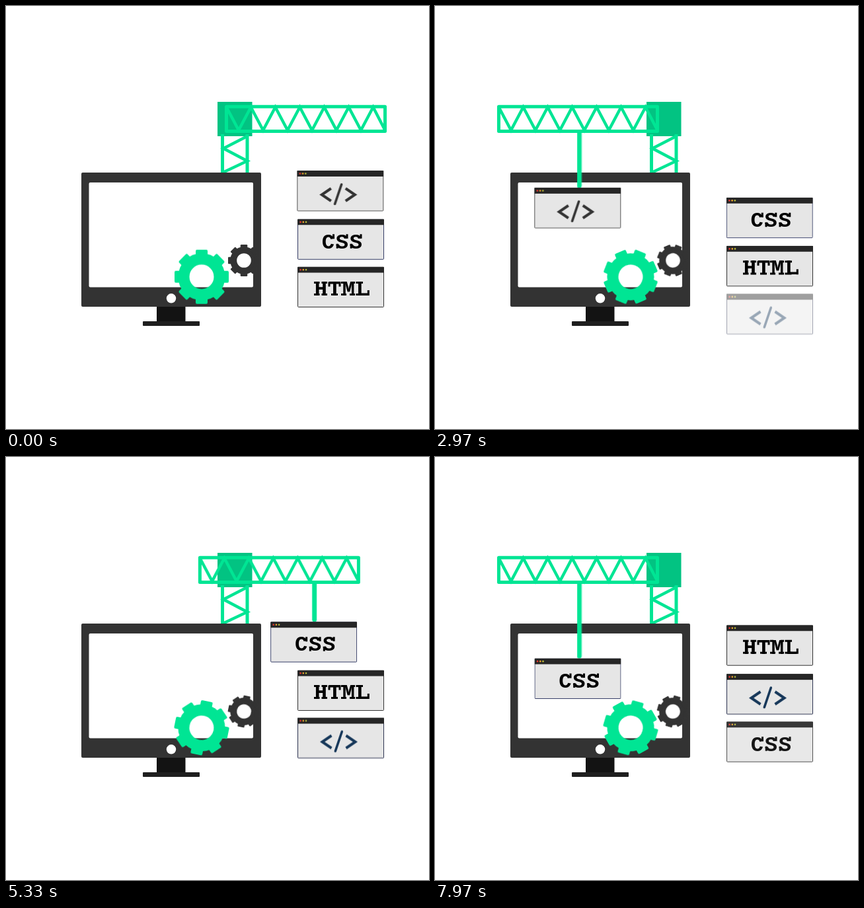
An HTML page without scripts that plays this animation: 640x640 px, repeating every 8000 ms.

```html
<!DOCTYPE html>
<html lang="en">
<head>
<meta charset="utf-8">
<title>Website under construction</title>
<style>
  html, body { margin: 0; width: 100%; height: 100%; overflow: hidden; background: #fff; }
  svg { display: block; width: 100vw; height: 100vh; }

  .green { stroke: #00e594; fill: none; stroke-width: 5; }
  .label { font: bold 32px "Liberation Mono", "Courier New", monospace; letter-spacing: 1.8px; }
  .serif { fill: none; stroke: #000; stroke-width: 3; }
  .icon { fill: none; stroke-width: 4; }

  .move { animation: 8s linear infinite; }
  .spin { animation-name: spin; }
  .boom { animation-name: boom; }
  .trolley { animation-name: trolley; }
  .rope { animation-name: rope; }
  .first { animation-name: first; }
  .second { animation-name: second; }
  .third { animation-name: third; }
  .fourth { animation-name: fourth; }
  .fifth { animation-name: fifth; }

  @keyframes spin { to { transform: rotate(422.4deg); } }

  /* Swing left with a load, swing back empty, repeat */
  @keyframes boom {
    0%, 7.15%, 56.45%, 63.6% { transform: translateX(0); }
    25.09%, 44.16%, 81.54%, 100% { transform: translateX(-237px); }
  }
  @keyframes trolley {
    0%, 25.09%, 56.46%, 81.54% { transform: translateX(0); }
    31.62%, 56.45%, 88.08%, 100% { transform: translateX(-51.5px); }
  }
  @keyframes rope {
    0%, 56.45% { transform: translateY(0); }
    7.15%, 25.09%, 63.6%, 81.54% { transform: translateY(60px); }
    31.62%, 88.08% { transform: translateY(59px); }
    44.16% { transform: translateY(120px); }
    100% { transform: translateY(117px); }
  }

  /* Cards: hauled by the crane, or queued in the column */
  @keyframes first {
    0%, 7.15% { transform: translate(0, 0); }
    25.09% { transform: translate(-238.5px, -1px); }
    31.62% { transform: translate(-290px, -1px); }
    44.16% { transform: translate(-290px, 60px); opacity: 1; }
    56.45%, 100% { transform: translate(-290px, 114px); opacity: 0; }
  }
  @keyframes second {
    0%, 31.62% { transform: translate(0, 0); }
    44.16% { transform: translate(-.5px, -74px); }
    56.45%, 63.6% { transform: translate(-.5px, -73px); }
    81.54% { transform: translate(-239px, -74px); }
    88.08% { transform: translate(-290.5px, -74px); }
    100% { transform: translate(-290.5px, -16px); }
  }
  @keyframes third {
    0%, 31.62% { transform: translateY(0); }
    44.16%, 88.08% { transform: translateY(-72px); }
    100% { transform: translateY(-142.4px); }
  }
  @keyframes fourth {
    0%, 31.62% { transform: translateY(73px); opacity: 0; }
    44.16%, 88.08% { transform: translateY(0); opacity: 1; }
    100% { transform: translateY(-68.5px); opacity: 1; }
  }
  @keyframes fifth {
    0%, 88.08% { transform: translateY(73px); opacity: 0; }
    100% { transform: translateY(3.6px); opacity: .95; }
  }
</style>
</head>
<body>
<svg viewBox="0 0 640 640">
  <defs>
    <rect id="tooth" x="-9" y="-41" width="18" height="13" rx="2"/>
    <g id="pair">
      <use href="#tooth"/>
      <use href="#tooth" transform="rotate(180)"/>
    </g>
    <g id="gear">
      <circle r="27" fill="none" stroke="currentColor" stroke-width="17"/>
      <g fill="currentColor">
        <use href="#pair"/>
        <use href="#pair" transform="rotate(45)"/>
        <use href="#pair" transform="rotate(90)"/>
        <use href="#pair" transform="rotate(135)"/>
      </g>
    </g>

    <g id="card">
      <rect x=".5" y=".5" width="130" height="60.5" rx="1" fill="#e6e6e6" stroke="currentColor"/>
      <path d="M0 9V1Q0 0 1 0H130Q131 0 131 1V9Z" fill="#262626"/>
      <circle cx="4.6" cy="4.6" r="1.3" fill="#e8352e"/>
      <circle cx="8.8" cy="4.6" r="1.3" fill="#f0a52c"/>
      <circle cx="13" cy="4.6" r="1.3" fill="#b5b83a"/>
    </g>
    <g id="code" class="icon" stroke="currentColor">
      <path d="M51.5 27L37.5 36.5L51.5 46M73.5 27L87.5 36.5L73.5 46"/>
      <path d="M67.3 21L57.3 50.5" stroke-width="3.6" stroke-linecap="round"/>
    </g>
    <g id="css">
      <text class="label" x="36.8" y="44.3">CSS</text>
      <path class="serif" d="M54.5 23V30M75 23V29.5M96 23V29.5M60.2 37.5V44.5M81.2 37.5V44.5"/>
    </g>
    <g id="html">
      <text class="label" x="25.8" y="43.6">HTML</text>
      <path class="serif" d="M25 24h8.5M36.5 24h8.5M25 42.1h8.5M36.5 42.1h8.5
        M48 23v7M64 23v7M51 42.1h10M66 24h5M82 24h5M66 42.1h8M79 42.1h8
        M88.5 24h10.5M88.5 42.1h10M107.3 35.5v8"/>
    </g>
    <clipPath id="below"><rect x="0" y="189" width="640" height="300"/></clipPath>
  </defs>

  <!-- Tower -->
  <rect x="320" y="145" width="52.5" height="52" fill="#02c382"/>
  <g class="green">
    <path d="M327.5 194V256M365 194V256"/>
    <path d="M365 197L329 215.5L365 234.5L329 251.5" stroke-width="4.5"/>
  </g>

  <!-- Monitor -->
  <rect x="228" y="454" width="43.5" height="24" fill="#131313"/>
  <rect x="207" y="477" width="86" height="7" rx="1" fill="#1f1f1f"/>
  <rect x="114" y="252" width="272" height="203" rx="2" fill="#333"/>
  <rect x="125.5" y="267" width="248.5" height="158.5" rx="2" fill="#fff"/>
  <circle cx="250" cy="442.3" r="7.2" fill="#fff"/>

  <!-- Gears -->
  <g transform="translate(360 385) scale(.585)" color="#333">
    <g class="move spin"><use href="#gear"/></g>
  </g>
  <g transform="translate(296 409.7)" color="#00e594">
    <g class="move spin"><use href="#gear"/></g>
  </g>

  <!-- Boom and rope -->
  <g class="move boom">
    <g clip-path="url(#below)">
      <g class="move trolley">
        <path class="green move rope" d="M506.8 40V186" style="stroke-width:7;stroke-linecap:round"/>
      </g>
    </g>
    <g class="green">
      <rect x="333.5" y="152.2" width="240" height="37.2" stroke-linejoin="round"/>
      <path stroke-width="4.5" d="M333.5 153l18.5 35l18.5-35l18.5 35l18.5-35l18.5 35l18.5-35l18.5 35l18.5-35l18.5 35l18.5-35l18.5 35l18.5-35l18 35"/>
    </g>
  </g>

  <!-- Cards -->
  <g transform="translate(441 394.5)">
    <g class="move fifth" color="#444"><use href="#card"/><use href="#css"/></g>
    <g class="move fourth" color="#17385a"><use href="#card" color="#2c3350"/><use href="#code"/></g>
    <g class="move third" color="#333"><use href="#card"/><use href="#html"/></g>
  </g>
  <g transform="translate(441 322.3)">
    <g class="move second" color="#343c66"><use href="#card"/><use href="#css"/></g>
  </g>
  <g transform="translate(440.3 249)">
    <g class="move first" color="#333"><use href="#card" color="#555"/><use href="#code"/></g>
  </g>
</svg>
</body>
</html>
```
